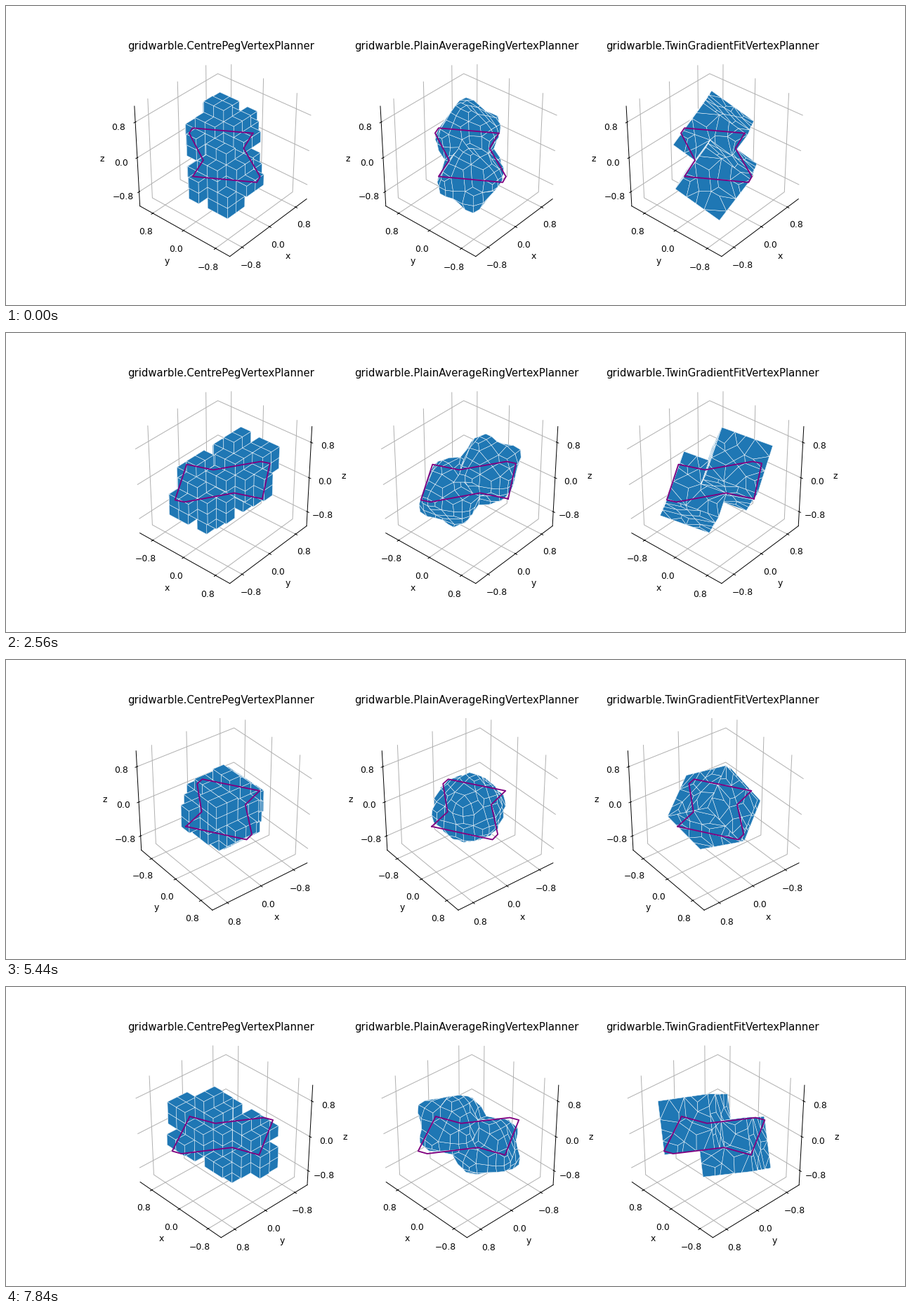
Recreate the animation shown at these times as a matplotlib script. Size 1280 by 427 pixels, loop 8 s.

```python
import numpy as np
import matplotlib.pyplot as plt
from matplotlib.animation import FuncAnimation
from mpl_toolkits.mplot3d.art3d import Poly3DCollection

W, H, DPI = 1280, 427, 800 / 9
FRAMES, INTERVAL = 50, 160
START, STEP, ELEV = -139, 360 / 64, 35

BOUND, RES = 1.1, 10          # sampling grid
CELL = 2 * BOUND / (RES - 1)
SHIFT, HALF = 0.25, 0.5       # cube centres at +-SHIFT on the diagonal


def diagonal_rotation(angle):
    """Rotation matrix about the axis (1, 1, 1)."""
    u = (1 - np.cos(angle)) / 3
    v = np.sin(angle) / np.sqrt(3)
    a, b, c = np.cos(angle) + u, u - v, u + v
    return np.array([[a, b, c], [c, a, b], [b, c, a]])


ROT = diagonal_rotation(np.pi / 4)


def sdf(p):
    """Signed distance to the union of two turned cubes."""
    dists = []
    for s in (SHIFT, -SHIFT):
        q = np.abs(p @ ROT - s) - HALF
        outside = np.linalg.norm(np.maximum(q, 0), axis=-1)
        dists.append(outside + np.minimum(q.max(axis=-1), 0))
    return np.minimum(*dists)


def gradient(p, h=1e-4):
    g = np.stack([sdf(p + h * e) - sdf(p - h * e) for e in np.eye(3)], axis=-1)
    return g / np.linalg.norm(g, axis=-1, keepdims=True)


def crossing(lo, hi):
    """Bisect for the zero between the point arrays lo and hi."""
    sign = np.sign(sdf(lo))
    for _ in range(30):
        mid = (lo + hi) / 2
        same = (np.sign(sdf(mid)) == sign)[:, None]
        lo, hi = np.where(same, mid, lo), np.where(same, hi, mid)
    return (lo + hi) / 2


def find_cells():
    """Return quads of cell ids, cell indices and edge hits per cell."""
    ticks = np.linspace(-BOUND, BOUND, RES)
    points = np.stack(np.meshgrid(ticks, ticks, ticks, indexing="ij"), axis=-1)
    inside = sdf(points) < 0
    ids, hits, quads = {}, [], []
    for axis in range(3):
        step = np.eye(3, dtype=int)
        d, e, f = step[axis], step[(axis + 1) % 3], step[(axis + 2) % 3]
        edges = np.argwhere(np.diff(inside, axis=axis))
        lo = points[tuple(edges.T)]
        for idx, hit in zip(edges, crossing(lo, lo + CELL * d)):
            quad = []
            for off in (0 * e, e, e + f, f):
                key = tuple(idx - off)
                if key not in ids:
                    ids[key] = len(ids)
                    hits.append([])
                hits[ids[key]].append(hit)
                quad.append(ids[key])
            quads.append(quad)
    return np.array(quads), np.array(list(ids)), [np.array(h) for h in hits]


def midpoint(cell, hits):
    return (cell + 0.5) * CELL - BOUND


def average(cell, hits):
    return hits.mean(axis=0)


def sharp(cell, hits, bias=1e-5):
    """Least-squares meeting point of the tangent planes."""
    mean, n = hits.mean(axis=0), gradient(hits)
    rhs = (n * (hits - mean)).sum(axis=1)
    return mean + np.linalg.solve(n.T @ n + bias * np.eye(3), n.T @ rhs)


def slice_outline():
    """Outline of the union in the plane z = 0."""
    rows = ROT.T[:, :2]

    def meet(i, di, j, dj):
        return np.linalg.solve(rows[[i, j]], [di, dj])

    near, far = SHIFT - HALF, SHIFT + HALF
    half = np.array([
        meet(0, far, 1, near),
        meet(0, far, 1, far),
        meet(1, far, 2, near),
        meet(1, -near, 2, near),
    ])
    loop = np.vstack([half, -half, half[:1]])
    return loop[:, 0], loop[:, 1], np.zeros(len(loop))


def setup_axes(ax, title):
    lim = BOUND * 25 / 24
    ax.set(xlim=(-lim, lim), ylim=(-lim, lim), zlim=(-lim, lim),
           xlabel="x", ylabel="y", zlabel="z")
    ax.set_box_aspect((1, 1, 1))
    for axis in (ax.xaxis, ax.yaxis, ax.zaxis):
        axis.set_pane_color((1, 1, 1, 0))
        axis.set_ticks([-0.8, 0, 0.8])
    ax.set_title(title)


PANELS = [
    ("gridwarble.CentrePegVertexPlanner", midpoint),
    ("gridwarble.PlainAverageRingVertexPlanner", average),
    ("gridwarble.TwinGradientFitVertexPlanner", sharp),
]

fig, axes = plt.subplots(
    1, 3, figsize=((W + 1e-6) / DPI, (H + 1e-6) / DPI), dpi=DPI,
    subplot_kw={"projection": "3d", "computed_zorder": False})

quads, cells, hits = find_cells()
outline = slice_outline()
for ax, (title, place) in zip(axes, PANELS):
    setup_axes(ax, title)
    verts = np.array([place(c, h) for c, h in zip(cells, hits)])
    ax.add_collection3d(Poly3DCollection(
        verts[quads], facecolors="tab:blue", edgecolors="white",
        linewidths=0.4, zorder=1))
    ax.plot(*outline, color="purple", lw=1.5, zorder=2)


def update(i):
    for ax in axes:
        ax.view_init(elev=ELEV, azim=START + STEP * i)
    return []


anim = FuncAnimation(fig, update, frames=FRAMES, interval=INTERVAL,
                     repeat=True, repeat_delay=0, blit=False)
plt.show()
```
